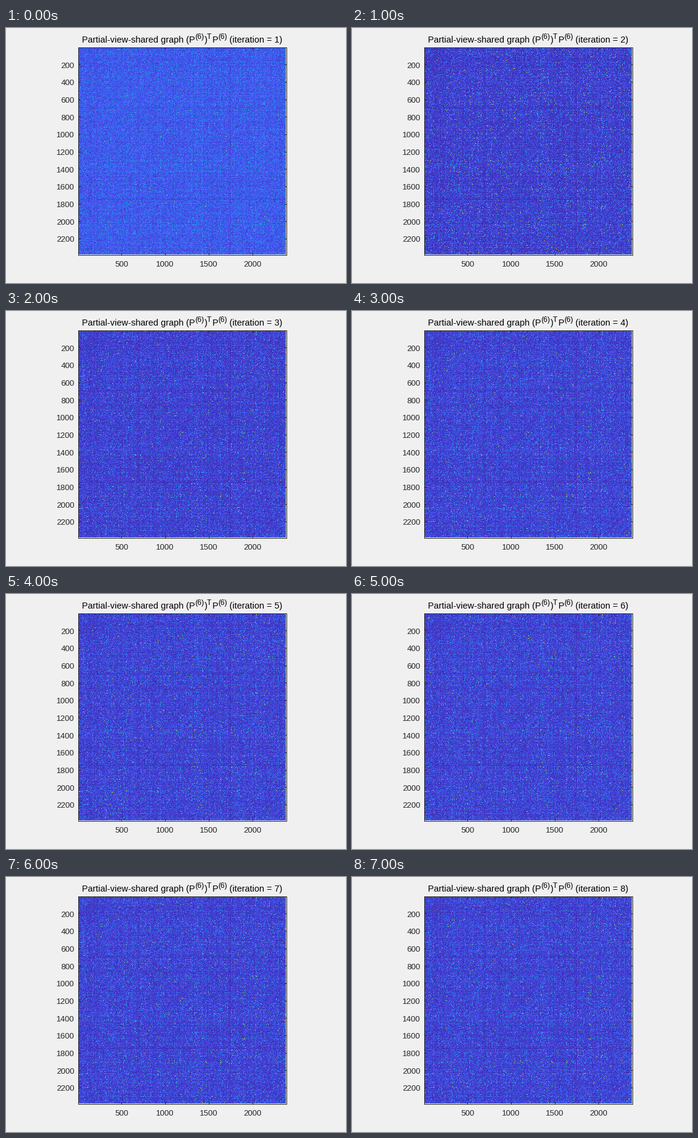
These frames come from a looping animation (560 by 420 pixels, 8000 ms). A matplotlib script:

```python
import numpy as np
import matplotlib.pyplot as plt
from matplotlib.animation import FuncAnimation
from matplotlib.colors import LinearSegmentedColormap

W, H, DPI = 560, 420, 100
LEFT, RIGHT, TOP, BOTTOM = 118.5, 461.5, 31.5, 373.5
SIZE = 2386                      # rows and columns of the graph matrix
N = 342                          # visible samples per side
STEPS = 8
INK = "#262626"

plt.rcParams["font.family"] = "Liberation Sans"

PARULA = LinearSegmentedColormap.from_list("parula", [
    (0.2422, 0.1504, 0.6603), (0.2810, 0.3228, 0.9579),
    (0.1786, 0.5289, 0.9682), (0.0689, 0.6948, 0.8394),
    (0.2161, 0.7843, 0.5923), (0.6720, 0.7793, 0.2227),
    (0.9970, 0.7659, 0.2199), (0.9769, 0.9839, 0.0805)])

# median, spread and share of fresh noise for each iteration
STAGES = [(0.155, 0.48, 0.9), (0.068, 0.95, 0.7), (0.074, 0.85, 0.4)]
LATE = (0.080, 0.83, 0.3)


def symmetric_noise(seed):
    z = np.random.default_rng(seed).standard_normal((N, N))
    upper = np.triu(z)
    return upper + np.triu(z, 1).T


CORE = symmetric_noise(100)
LINES = np.random.default_rng(7).standard_normal(N)
STREAKS = 0.2 * (LINES[:, None] + LINES[None, :])


def graph(step):
    median, spread, fresh = STAGES[step] if step < len(STAGES) else LATE
    z = np.sqrt(1 - fresh**2) * CORE + fresh * symmetric_noise(step)
    v = median * np.exp(spread * (0.96 * z + STREAKS))
    if step >= 2:
        v[64:80, 8] += 0.15
    return np.clip(v[:-1], 0, 1)


def px(size):
    return size * 72 / DPI


def label(x, y, text, size=13.33, color=INK, ha="left"):
    return ax.text(x, y, text, fontsize=px(size), color=color,
                   ha=ha, va="baseline")


def line(xs, ys):
    ax.plot(xs, ys, color=INK, lw=px(1), solid_capstyle="projecting", zorder=3)


fig = plt.figure(figsize=(W / DPI, H / DPI), dpi=DPI, facecolor="#f0f0f0")
ax = fig.add_axes([0, 0, 1, 1])
image = ax.imshow(graph(0), cmap=PARULA, vmin=0, vmax=1, aspect="auto",
                  interpolation="nearest",
                  extent=(LEFT + 0.5, RIGHT - 0.5, BOTTOM - 0.5, TOP + 0.5))
ax.set(xlim=(0, W), ylim=(H, 0))
ax.axis("off")

line([LEFT, RIGHT, RIGHT, LEFT, LEFT], [TOP, TOP, BOTTOM, BOTTOM, TOP])

TICK = 3
for value in range(500, 2001, 500):
    x = LEFT + value * (RIGHT - LEFT) / SIZE
    line([x, x], [BOTTOM, BOTTOM - TICK])
    line([x, x], [TOP, TOP + TICK])
    label(x, 393, str(value), ha="center")
for value in range(200, 2201, 200):
    y = TOP + value * (BOTTOM - TOP) / SIZE
    line([LEFT, LEFT + TICK], [y, y])
    line([RIGHT, RIGHT - TICK], [y, y])
    label(112.5, y + 5.5, str(value), ha="right")

BASE, RAISED = 24, 18
for x, y, text, size in [(125, BASE, "Partial-view-shared graph (P", 14.67),
                         (311, RAISED, "(6)", 12.3),
                         (326.5, BASE, ")", 14.67),
                         (331, RAISED, "T", 12.3),
                         (339.5, BASE, "P", 14.67),
                         (349, RAISED, "(6)", 12.3)]:
    label(x, y, text, size, "black")
counter = label(455, BASE, "", 14.67, "black", "right")


def update(step):
    image.set_data(graph(step))
    counter.set_text(f"(iteration = {step + 1})")
    return image, counter


anim = FuncAnimation(fig, update, frames=STEPS, interval=1000,
                     repeat=True, repeat_delay=0)
plt.show()
```
